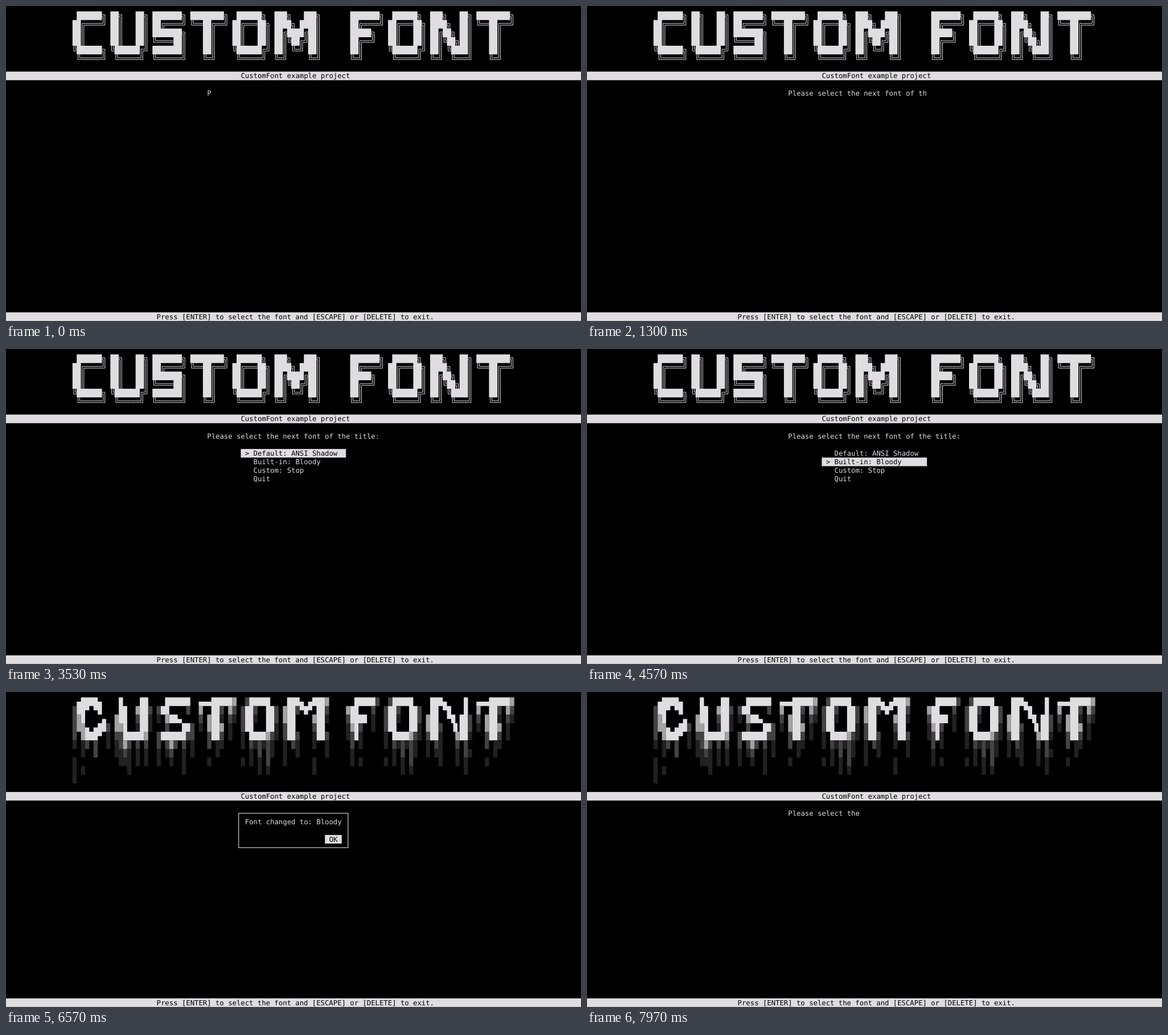
These frames come from a looping animation (1010x555 px, 8000 ms). An HTML page:

```html
<!DOCTYPE html>
<html lang="en">
<head>
<meta charset="utf-8">
<title>Custom font menu</title>
<style>
  html, body { margin: 0; width: 100%; height: 100%; overflow: hidden; background: #000; }
  svg { display: block; width: 1010px; height: 555px; }
  text {
    font: 12.275px "DejaVu Sans Mono", "Liberation Mono", monospace;
    text-rendering: geometricPrecision;
    white-space: pre;
  }
</style>
</head>
<body>
<svg id="stage" viewBox="0 0 1010 555"></svg>
<script>
const LOOP = 8000, TICK = 100 / 3, CHAR_MS = 41;
const CW = 7.39, RH = 15.15, X0 = 116.8, Y0 = 9.5, BASE = 11.8;
const FG = '#dfdddf', BG = '#000';
const PROMPT = 'Please select the next font of the title:';
const ITEMS = ['Default: ANSI Shadow', 'Built-in: Bloody', 'Custom: Stop', 'Quit'];
const ITEM_TIMES = [1730, 1765, 1798, 1830];
const SELECT_AT = 3665, POPUP_AT = 4930, CLOSE_AT = 7298;
const FIRST_CHAR = -30, SECOND_CHAR = 7308;

const SHADOW = {
  C: ' ██████╗/██╔════╝/██║/██║/╚██████╗/ ╚═════╝',
  U: '██╗   ██╗/██║   ██║/██║   ██║/██║   ██║/╚██████╔╝/ ╚═════╝',
  S: '███████╗/██╔════╝/███████╗/╚════██║/███████║/╚══════╝',
  T: '████████╗/╚══██╔══╝/   ██║/   ██║/   ██║/   ╚═╝',
  O: ' ██████╗/██╔═══██╗/██║   ██║/██║   ██║/╚██████╔╝/ ╚═════╝',
  M: '███╗   ███╗/████╗ ████║/██╔████╔██║/██║╚██╔╝██║/██║ ╚═╝ ██║/╚═╝     ╚═╝',
  F: '███████╗/██╔════╝/█████╗/██╔══╝/██║/╚═╝',
  N: '███╗   ██╗/████╗  ██║/██╔██╗ ██║/██║╚██╗██║/██║ ╚████║/╚═╝  ╚═══╝',
  ' ': '     '
};
const BLOODY = {
  C: ' ▄████▄/▒██▀ ▀█/▒▓█    ▄/▒▓▓▄ ▄██▒/▒ ▓███▀ ░/░ ░▒ ▒  ░/  ░  ▒/░/░ ░/░',
  U: ' █    ██/ ██  ▓██▒/▓██  ▒██░/▓▓█  ░██░/▒▒█████▓/░▒▓▒ ▒ ▒/░░▒░ ░ ░/ ░░░ ░ ░/   ░',
  S: '  ██████/▒██    ▒/░ ▓██▄/  ▒   ██▒/▒██████▒▒/▒ ▒▓▒ ▒ ░/░ ░▒  ░ ░/░  ░  ░/      ░',
  T: '▄▄▄█████▓/▓  ██▒ ▓▒/▒ ▓██░ ▒░/░ ▓██▓ ░/  ▒██▒ ░/  ▒ ░░/    ░/  ░',
  O: ' ▒█████/▒██▒  ██▒/▒██░  ██▒/▒██   ██░/░ ████▓▒░/░ ▒░▒░▒░/  ░ ▒ ▒░/░ ░ ░ ▒/    ░ ░',
  M: ' ███▄ ▄███▓/▓██▒▀█▀ ██▒/▓██    ▓██░/▒██    ▒██/▒██▒   ░██▒/░ ▒░   ░  ░/░  ░      ░/░      ░/       ░',
  F: '  █████▒/▓██   ▒/▒████ ░/░▓█▒  ░/░▒█░/ ▒ ░/ ░/ ░ ░',
  N: ' ███▄    █/ ██ ▀█   █/▓██  ▀█ ██▒/▓██▒  ▐▌██▒/▒██░   ▓██░/░ ▒░   ▒ ▒/░ ░░   ░ ▒░/   ░   ░ ░/         ░',
  ' ': '  '
};

// Part of the cell each block covers: x, y, width, height, fill
const BLOCKS = {
  '█': [0, 0, 1, 1, FG], '▀': [0, 0, 1, .5, FG], '▄': [0, .5, 1, .5, FG],
  '▌': [0, 0, .5, 1, FG], '▐': [.5, 0, .5, 1, FG],
  '▓': [0, 0, 1, 1, '#a4a3a4'], '▒': [0, 0, 1, 1, '#444344'], '░': [0, 0, 1, 1, '#212121']
};
// Directions of the two arms of a double-line corner
const CORNERS = { '╗': [-1, 1], '╝': [-1, -1], '╔': [1, 1], '╚': [1, -1] };

const stage = document.getElementById('stage');
const colX = c => X0 + c * CW;
const rowY = r => Y0 + r * RH;

function add(parent, tag, attrs) {
  const el = document.createElementNS('http://www.w3.org/2000/svg', tag);
  for (const k in attrs) el.setAttribute(k, attrs[k]);
  return parent.appendChild(el);
}
const group = parent => add(parent, 'g', {});
const show = (el, on) => el.setAttribute('display', on ? 'inline' : 'none');

function label(parent, col, row, str, fill = FG) {
  const el = add(parent, 'text', { x: colX(col), y: rowY(row) + BASE, fill });
  el.textContent = str;
  return el;
}
function bar(parent, col, row, cols) {
  return add(parent, 'rect', { x: colX(col), y: rowY(row), width: cols * CW, height: RH, fill: FG });
}
function fullBar(parent, row, col, str) {
  add(parent, 'rect', { x: 0, y: rowY(row), width: 1010, height: RH, fill: FG });
  label(parent, col, row, str, BG);
}

function doubleLine(ch, x, y) {
  const d = 1.5, cx = x + CW / 2, cy = y + RH / 2;
  return [-d, d].map(o => {
    if (ch === '═') return `M${x} ${cy + o}h${CW}`;
    if (ch === '║') return `M${cx + o} ${y}v${RH}`;
    const [sx, sy] = CORNERS[ch];
    return `M${cx + sx * CW / 2} ${cy + sy * o}H${cx + sx * o}V${cy + sy * RH / 2}`;
  }).join('');
}

function banner(font, word) {
  const g = group(stage), fills = {};
  let lines = '', col = 0;
  for (const letter of word) {
    const rows = font[letter].split('/');
    rows.forEach((row, r) => [...row].forEach((ch, c) => {
      if (ch === ' ') return;
      const x = colX(col + c), y = rowY(r), block = BLOCKS[ch];
      if (!block) { lines += doubleLine(ch, x, y); return; }
      const [bx, by, bw, bh, fill] = block;
      fills[fill] = (fills[fill] || '') +
        `M${x + bx * CW} ${y + by * RH}h${bw * CW}v${bh * RH}h${-bw * CW}z`;
    }));
    col += Math.max(...rows.map(r => r.length)) + 1;
  }
  for (const fill in fills) add(g, 'path', { d: fills[fill], fill });
  add(g, 'path', { d: lines, fill: 'none', stroke: FG, 'stroke-width': 1 });
  return g;
}

function screen(font, barRow) {
  const g = banner(font, 'CUSTOM FONT');
  fullBar(g, barRow, 40, 'CustomFont example project');
  return { g, prompt: label(g, 32, barRow + 2, '') };
}

add(stage, 'rect', { width: 1010, height: 555, fill: BG });
const first = screen(SHADOW, 7), second = screen(BLOODY, 11);
fullBar(stage, 35, 20, 'Press [ENTER] to select the font and [ESCAPE] or [DELETE] to exit.');

const menu = ITEMS.map((name, i) => {
  const plain = group(first.g), active = group(first.g), row = 11 + i;
  label(plain, 43, row, name);
  bar(active, 40, row, 25);
  label(active, 41, row, '> ' + name, BG);
  return { plain, active };
});

const popup = group(second.g);
add(popup, 'rect', {
  x: colX(39.5), y: rowY(13.5) - .4, width: 26 * CW, height: 4 * RH,
  fill: 'none', stroke: FG, 'stroke-width': 1.1
});
label(popup, 41, 14, 'Font changed to: Bloody');
bar(popup, 60, 16, 4);
label(popup, 61, 16, 'OK', BG);

const typed = (t, start) =>
  PROMPT.slice(0, Math.max(0, Math.floor((t - start) / CHAR_MS) + 1));

function draw(time) {
  // The screen refreshes 30 times a second
  const t = Math.floor((time + 3.4) / TICK) * TICK + .01;
  const changed = t >= POPUP_AT;
  show(first.g, !changed);
  show(second.g, changed);
  first.prompt.textContent = typed(t, FIRST_CHAR);
  second.prompt.textContent = typed(t, SECOND_CHAR);
  show(popup, t < CLOSE_AT);
  const selected = t >= SELECT_AT ? 1 : 0;
  menu.forEach((item, i) => {
    const visible = t >= ITEM_TIMES[i];
    show(item.plain, visible && i !== selected);
    show(item.active, visible && i === selected);
  });
}

const start = performance.now();
function loop() {
  draw((performance.now() - start) % LOOP);
  requestAnimationFrame(loop);
}
draw(0);
loop();
</script>
</body>
</html>
```
